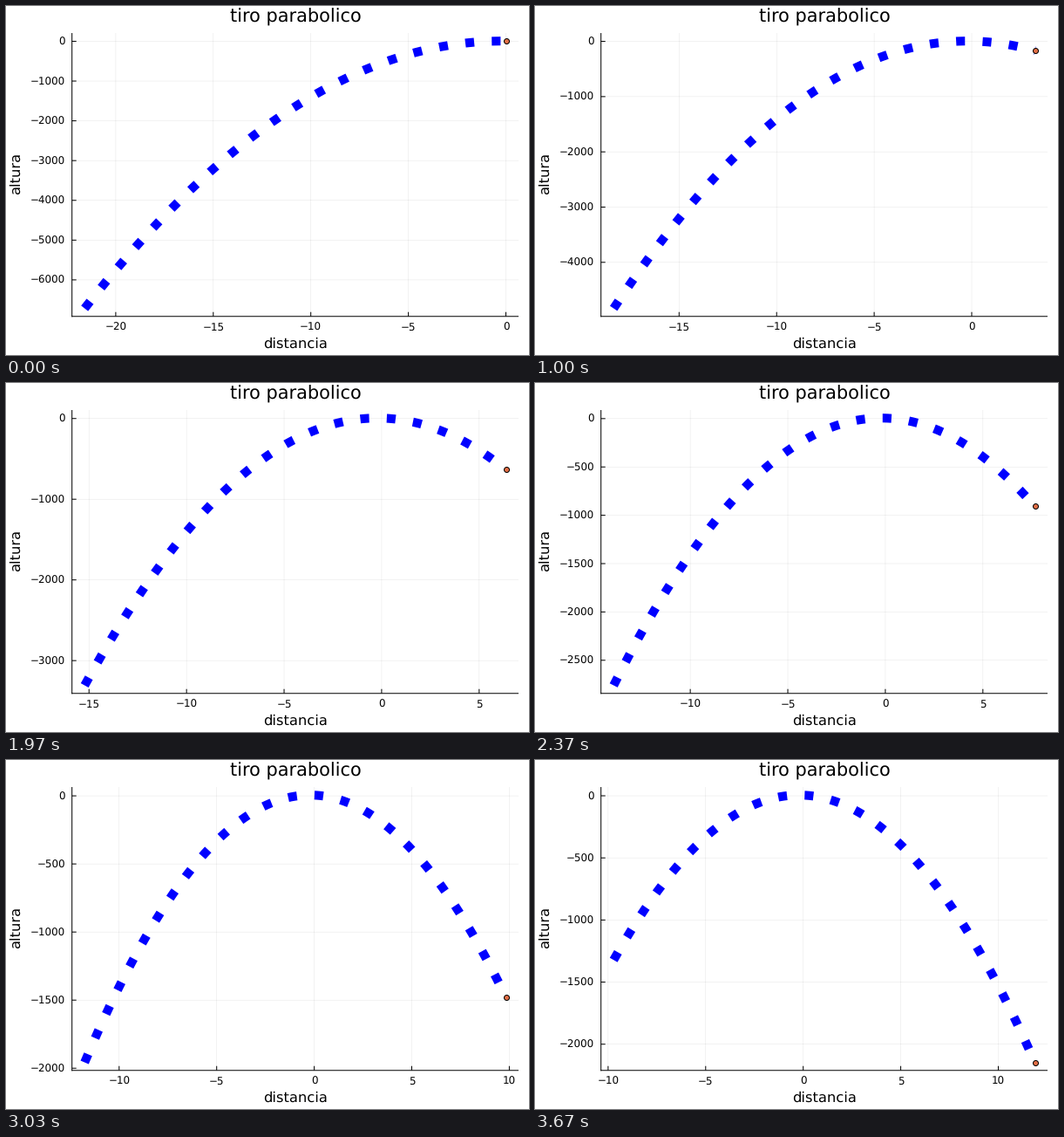
A matplotlib script for the animation above (3.71 s loop, 600x400 px).

```python
import math

import matplotlib.pyplot as plt
import numpy as np
from matplotlib.animation import FuncAnimation
from matplotlib.collections import LineCollection

W, H, DPI = 600, 400, 100
PX = 72 / DPI                      # points per pixel
LOOP_MS, TICK_MS = 3710, 10
LAST_SHOT, SHOTS_PER_TICK = 110, 0.3   # 30 shots per second

# Plot box in pixels, y measured downwards
LEFT, RIGHT, TOP, BOTTOM = 75.7, 588, 31, 355.75
TICK_LEN = 5
MARGIN = 0.03

# Projectile: the launch angle is 30 radians
SPEED, ANGLE, FALL, START_Y = 7, 30, 17.15, 5
STEP, TRAIL = 0.1, 200

plt.rcParams["font.family"] = "DejaVu Sans"
plt.rcParams["text.hinting"] = "none"

fig = plt.figure(figsize=(W / DPI, H / DPI), dpi=DPI, facecolor="white")
ax = fig.add_axes([0, 0, 1, 1])
ax.set_xlim(0, W)
ax.set_ylim(H, 0)
ax.axis("off")


def label(x, y, text, size, ha="center", rotation=0):
    return ax.text(x, y, text, fontsize=size * PX, ha=ha, va="baseline",
                   rotation=rotation, rotation_mode="anchor", color="black")


def lines(width, alpha, zorder):
    group = LineCollection([], colors=[(0, 0, 0, alpha)],
                           linewidths=width * PX, zorder=zorder)
    group.set_snap(False)
    group.set_capstyle("butt")
    return ax.add_collection(group, autolim=False)


def position(t):
    x = SPEED * math.cos(ANGLE) * t
    y = START_Y + SPEED * math.sin(ANGLE) * t - FALL * t ** 2
    return x, y


def limits(values):
    pad = MARGIN * (values.max() - values.min())
    return values.min() - pad, values.max() + pad


def tick_values(low, high, step):
    first, last = math.ceil(low / step), math.floor(high / step)
    return [n * step for n in range(first, last + 1)]


def tick_text(value):
    return str(value).replace("-", "\u2212")


def fill_labels(pool, ticks, place):
    for i, item in enumerate(pool):
        item.set_visible(i < len(ticks))
        if i < len(ticks):
            item.set_text(tick_text(ticks[i]))
            item.set_position(place(ticks[i]))


label(332, 19, "tiro parabolico", 20.9)
label(332, 392, "distancia", 16.4)
label(15.6, 192, "altura", 16.4, rotation=90)

grid = lines(0.5, 0.1, 1)
axes_lines = lines(1, 1, 2)
x_labels = [label(0, 0, "", 11.95) for _ in range(6)]
y_labels = [label(0, 0, "", 11.95, ha="right") for _ in range(8)]

trail, = ax.plot([], [], color="#0000ff", lw=10.115 * PX,
                 linestyle=(0, (1, 2)), dash_capstyle="butt", zorder=3)
ball, = ax.plot([], [], "o", ms=6 * PX, mfc="#e26f46", mec="black",
                mew=1 * PX, zorder=4)


def draw(tick):
    # Each shot starts at its time rounded to a whole tick
    shot = min(int((tick + 0.5) * SHOTS_PER_TICK), LAST_SHOT)
    t = np.arange(shot - TRAIL, shot + 1) * STEP
    x, y = position(t)
    x0, x1 = limits(x)
    y0, y1 = limits(y)

    def to_px(v):
        return LEFT + (v - x0) / (x1 - x0) * (RIGHT - LEFT)

    def to_py(v):
        return BOTTOM - (v - y0) / (y1 - y0) * (BOTTOM - TOP)

    px, py = to_px(x), to_py(y)
    trail.set_data(px, py)
    ball.set_data(px[-1:], py[-1:])

    x_ticks = tick_values(x0, x1, 5)
    y_ticks = tick_values(y0, y1, 1000)
    if len(y_ticks) < 4:
        y_ticks = tick_values(y0, y1, 500)
    cols = [to_px(v) for v in x_ticks]
    rows = [to_py(v) for v in y_ticks]

    grid.set_segments([[(c, TOP), (c, BOTTOM)] for c in cols]
                      + [[(LEFT, r), (RIGHT, r)] for r in rows])
    axes_lines.set_segments(
        [[(LEFT, TOP), (LEFT, BOTTOM + 0.5)],
         [(LEFT - 0.5, BOTTOM), (RIGHT, BOTTOM)]]
        + [[(c, BOTTOM), (c, BOTTOM - TICK_LEN)] for c in cols]
        + [[(LEFT, r), (LEFT + TICK_LEN, r)] for r in rows])

    fill_labels(x_labels, x_ticks, lambda v: (to_px(v), 372))
    fill_labels(y_labels, y_ticks, lambda v: (68, to_py(v) + 4.4))
    return trail, ball, grid, axes_lines, *x_labels, *y_labels


anim = FuncAnimation(fig, draw, frames=LOOP_MS // TICK_MS, interval=TICK_MS,
                     repeat=True, repeat_delay=0, blit=False)
plt.show()
```
